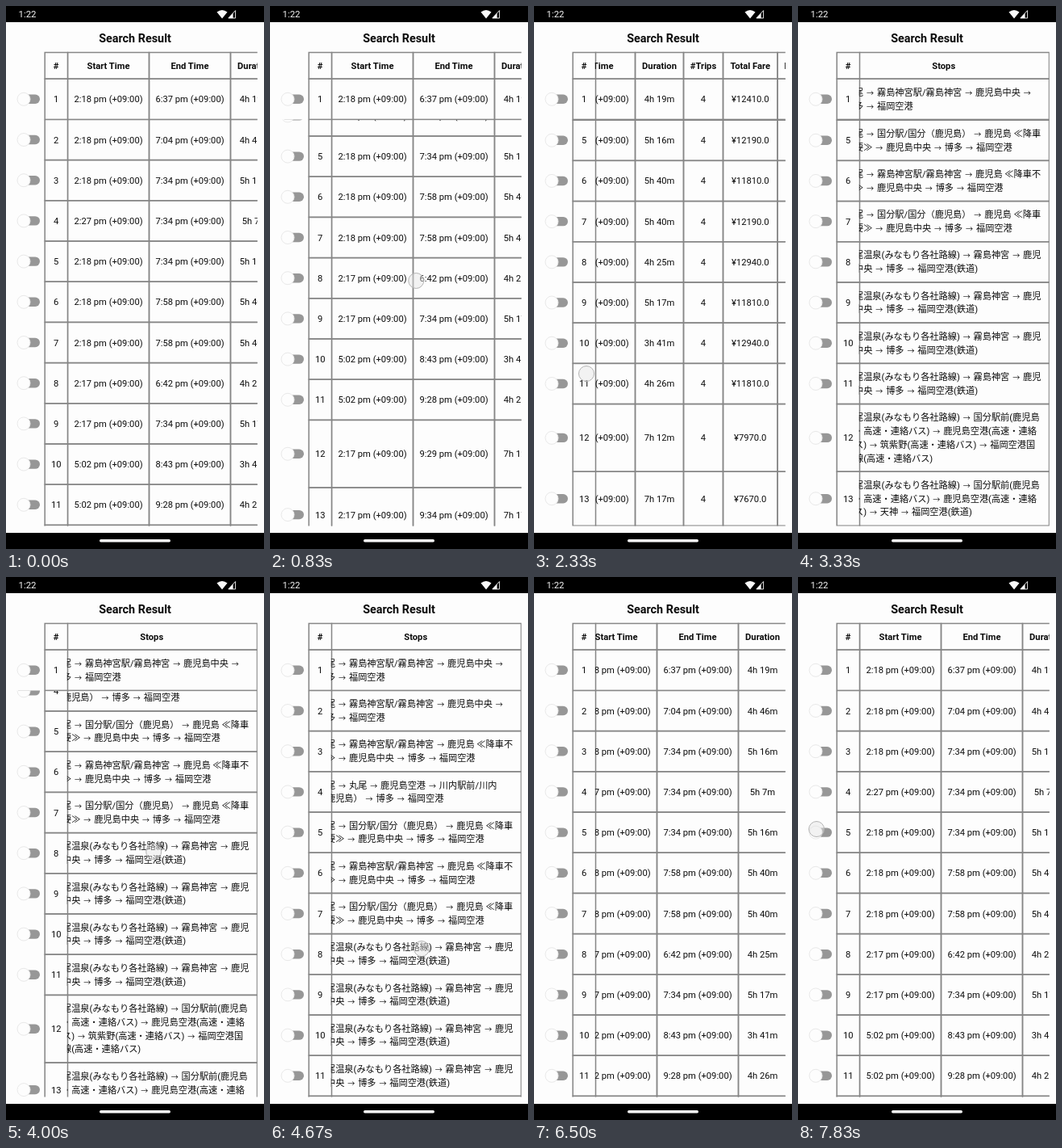
An HTML page that plays this animation: 320x672 px, repeating every 8 s.

```html
<!DOCTYPE html>
<html lang="en">
<head>
<meta charset="utf-8">
<title>Search Result</title>
<style>
  html, body { margin: 0; width: 100%; height: 100%; overflow: hidden; background: #fdfdfd; }
  svg { display: block; }
  text { font: 11.2px Roboto, "Noto Sans CJK JP", "Noto Sans CJK", sans-serif; fill: #0c0c0c; text-anchor: middle; }
  .bold { font-weight: 700; }
  .title { font-size: 14.4px; font-weight: 700; }
  .left { text-anchor: start; }
  .arrow { font-size: 9px; }
  .clock { font-size: 11.4px; fill: #f4f4f4; }
  .grid { fill: none; stroke: #868686; stroke-width: 1.5; }
  .track { fill: #979797; }
  .thumb { fill: #fdfdfd; stroke: #e9e9e9; stroke-width: 1; }
  .touch { fill: #e4e4e4; fill-opacity: .45; stroke: #b4b4b4; stroke-width: 1; }
</style>
</head>
<body>
<script>
const LOOP = 8000, FRAME = 1000 / 6;
const LEFT = 48.2, FIXED = 76.5, RIGHT = 311.8;
const TOP = 57.5, HEAD = 90.2, BOTTOM = 643.6;
const LINE = 16.75, PAD = 16.7;

const columns = [
  ['Start Time', 101], ['End Time', 101], ['Duration', 60], ['#Trips', 49],
  ['Total Fare', 67.5], ['Fare (Rail)', 68], ['Fare (Others)', 82.5],
  ['Walking', 56.5], ['Waiting', 55], ['Stops', 261.5]
];

const shrine = '丸尾 → 霧島神宮駅/霧島神宮 → 鹿児島';
const viaShrine = shrine + '中央 →\n博多 → 福岡空港';
const tail = '要≫ → 鹿児島中央 → 博多 → 福岡空港';
const shrineStay = shrine + ' ≪降車不\n' + tail;
const kokubuStay = '丸尾 → 国分駅/国分（鹿児島） → 鹿児島 ≪降車\n不' + tail;
const sendai = '丸尾 → 丸尾 → 鹿児島空港 → 川内駅前/川内\n（鹿児島） → 博多 → 福岡空港';
const spa = '丸尾温泉(みなもり各社路線) → ';
const spaRail = spa + '霧島神宮 → 鹿児\n島中央 → 博多 → 福岡空港(鉄道)';
const spaBus = spa + '国分駅前(鹿児島\n県・高速・連絡バス) → 鹿児島空港(高速・連絡\nバス) → ';

// start, end, duration, fare, walking, waiting, stops
const trips = [
  ['2:18', '6:37', '4h 19m', 12410, '22m', '1h 21m', viaShrine],
  ['2:18', '7:04', '4h 46m', 12410, '22m', '1h 28m', viaShrine],
  ['2:18', '7:34', '5h 16m', 11810, '22m', '1h 59m', shrineStay],
  ['2:27', '7:34', '5h 7m', 12940, '21m', '1h 42m', sendai],
  ['2:18', '7:34', '5h 16m', 12190, '21m', '1h 47m', kokubuStay],
  ['2:18', '7:58', '5h 40m', 11810, '22m', '2h 8m', shrineStay],
  ['2:18', '7:58', '5h 40m', 12190, '21m', '1h 56m', kokubuStay],
  ['2:17', '6:42', '4h 25m', 12940, '1m', '1h 47m', spaRail],
  ['2:17', '7:34', '5h 17m', 11810, '1m', '2h 18m', spaRail],
  ['5:02', '8:43', '3h 41m', 12940, '1m', '41m', spaRail],
  ['5:02', '9:28', '4h 26m', 11810, '1m', '1h 36m', spaRail],
  ['2:17', '9:29', '7h 12m', 7970, '1m', '3h 2m', spaBus + '筑紫野(高速・連絡バス) → 福岡空港国\n際線(高速・連絡バス)'],
  ['2:17', '9:34', '7h 17m', 7670, '1m', '3h 7m', spaBus + '天神 → 福岡空港(鉄道)']
];

function add(parent, tag, attrs = {}, content) {
  const el = document.createElementNS('http://www.w3.org/2000/svg', tag);
  for (const name in attrs) el.setAttribute(name, attrs[name]);
  if (content !== undefined) el.textContent = content;
  parent.appendChild(el);
  return el;
}
// Arrows are set smaller, with the spare width shared on both sides.
function label(parent, x, y, str, cls = '') {
  const text = add(parent, 'text', { x, y: y + 4, class: cls });
  String(str).split(/(→)/).forEach((part, i) => {
    const arrow = part === '→';
    if (part) add(text, 'tspan', { dx: i ? 1.1 : 0, class: arrow ? 'arrow' : '' }, part);
  });
}
const box = (parent, x, y, width, height, cls = 'grid') =>
  add(parent, 'rect', { x, y, width, height, class: cls });

const svg = add(document.body, 'svg', { width: 320, height: 672, viewBox: '0 0 320 672' });
const defs = add(svg, 'defs');
function clip(id, x, y, right, bottom) {
  box(add(defs, 'clipPath', { id }), x, y, right - x, bottom - y, '');
}

const strips = [];
// A section has a fixed number column and a strip that scrolls sideways.
function section(parent) {
  const fixed = add(parent, 'g');
  const strip = add(add(parent, 'g', { 'clip-path': 'url(#wide)' }), 'g');
  strips.push(strip);
  return { fixed, strip };
}

function drawRow({ fixed, strip }, y, height, name, cells, cls) {
  const mid = y + height / 2;
  box(fixed, LEFT, y, FIXED - LEFT, height);
  label(fixed, 62.2, mid, name, cls);
  let x = FIXED;
  cells.forEach((cell, i) => {
    const width = columns[i][1];
    box(strip, x, y, width, height);
    const lines = cell.split('\n');
    lines.forEach((line, n) => {
      const ly = mid + (n - (lines.length - 1) / 2) * LINE;
      if (lines.length > 1) label(strip, x + 8.8, ly, line, 'left');
      else label(strip, x + width / 2, ly, line, cls);
    });
    x += width;
  });
}

function drawToggle(parent, y) {
  add(parent, 'rect', { x: 15, y: y - 5.7, width: 27, height: 11.4, rx: 5.7, class: 'track' });
  add(parent, 'circle', { cx: 22, cy: y, r: 8, class: 'thumb' });
}

function drawTrip(target, i, y) {
  const [start, end, duration, fare, walking, waiting, stops] = trips[i];
  const height = stops.split('\n').length * LINE + PAD;
  const yen = `¥${fare}.0`, rail = i < 7;
  const zone = ' pm (+09:00)';
  drawRow(target, y, height, i + 1, [start + zone, end + zone, duration, '4', yen,
    rail ? yen : '-', rail ? '-' : yen, walking, waiting, stops]);
  drawToggle(target.fixed, y + height / 2);
  return y + height;
}

const firstEnd = HEAD + 2 * LINE + PAD;
clip('wide', FIXED - .7, 0, RIGHT, 1000);
clip('below', 0, firstEnd, 320, BOTTOM);

add(svg, 'rect', { width: 320, height: 672, fill: '#fdfdfd' });
const body = add(add(svg, 'g', { 'clip-path': 'url(#below)' }), 'g');
const bodyPart = section(body);
let y = firstEnd;
for (let i = 1; i < trips.length; i++) y = drawTrip(bodyPart, i, y);
const maxDown = y - 643.2;

const topPart = section(add(svg, 'g'));
drawRow(topPart, TOP, HEAD - TOP, '#', columns.map(c => c[0]), 'bold');
drawTrip(topPart, 0, HEAD);

label(svg, 160, 40.6, 'Search Result', 'title');

// System bars
add(svg, 'rect', { width: 320, height: 20 });
add(svg, 'rect', { y: 652, width: 320, height: 20 });
label(svg, 15.5, 10.4, '1:22', 'left clock');
const white = '#fafafa';
add(svg, 'path', { d: 'M261.5 7.6Q268 2.6 274.5 7.6L268 15.4Z', fill: white });
add(svg, 'path', { d: 'M275.8 15H284.6V5.6Z', fill: 'none', stroke: white, 'stroke-width': .9 });
add(svg, 'path', { d: 'M275.8 15H281.6V8.8Z', fill: white });
add(svg, 'rect', { x: 116, y: 660, width: 88, height: 3.4, rx: 1.7, fill: white });

const touch = add(svg, 'circle', { r: 9.5, class: 'touch' });

// Steps: [tick, value]
const down = [[2, 0], [3, 30], [4, 85], [5, 130], [6, maxDown], [23, maxDown], [24, 125], [25, 80], [26, 35], [27, 0]];
const across = [[11, 0], [12, 50], [14, 153], [15, 270], [16, 350], [17, 460], [18, 570], [19, 635], [20, 667],
  [31, 667], [32, 625], [35, 452], [36, 320], [37, 190], [38, 90], [39, 25], [40, 0]];
// Drags: first tick, last tick, from x, y, to x, y
const drags = [
  [2, 6, 185, 460, 180, 300],
  [11, 14, 218, 462, 65, 455],
  [16, 18, 250, 458, 60, 452],
  [23, 28, 182, 310, 188, 460],
  [31, 35, 89, 445, 304, 433],
  [47, 47, 23, 312, 23, 312]
];

const mix = (a, b, p) => a + (b - a) * p;
function at(steps, tick) {
  const next = steps.findIndex(s => s[0] >= tick);
  if (next < 0) return steps[steps.length - 1][1];
  if (next === 0) return steps[0][1];
  const [t0, v0] = steps[next - 1], [t1, v1] = steps[next];
  return mix(v0, v1, (tick - t0) / (t1 - t0));
}

function draw(time) {
  const tick = Math.floor(((time + 4) % LOOP) / FRAME);
  body.setAttribute('transform', `translate(0 ${-at(down, tick)})`);
  const sx = at(across, tick);
  strips.forEach(s => s.setAttribute('transform', `translate(${-sx} 0)`));
  const drag = drags.find(d => tick >= d[0] && tick <= d[1]);
  touch.setAttribute('visibility', drag ? 'visible' : 'hidden');
  if (drag) {
    const [t0, t1, x0, y0, x1, y1] = drag;
    const p = t1 > t0 ? (tick - t0) / (t1 - t0) : 1;
    touch.setAttribute('cx', mix(x0, x1, p));
    touch.setAttribute('cy', mix(y0, y1, p));
  }
}

const began = performance.now();
function loop() {
  draw(performance.now() - began);
  requestAnimationFrame(loop);
}
loop();
</script>
</body>
</html>
```
